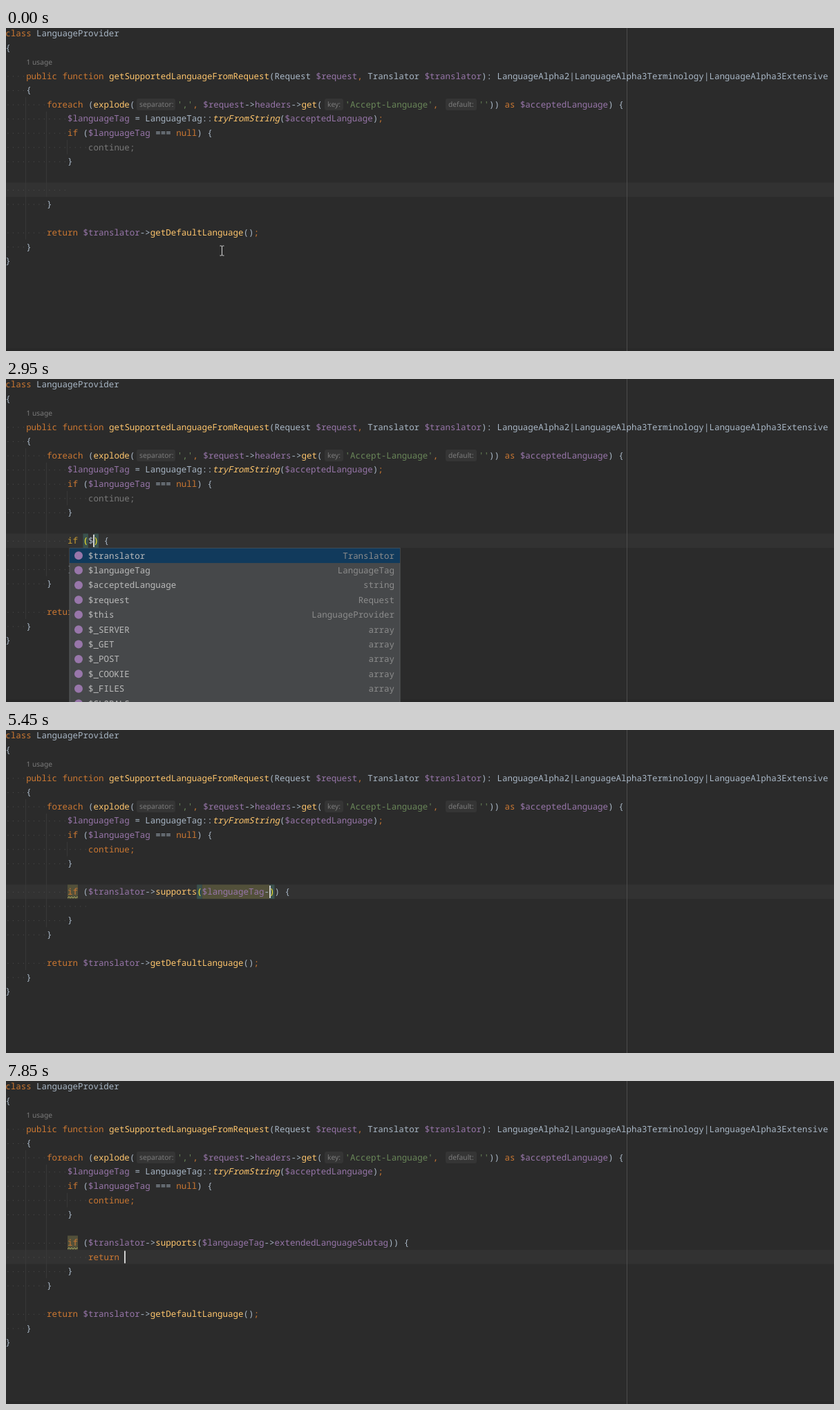
Animation, 1198 px wide and 467 px high, one loop 8 s. Source, as an HTML page:

```html
<!DOCTYPE html>
<html lang="en">
<head>
<meta charset="utf-8">
<title>Typing in a code editor</title>
<style>
  html, body { margin: 0; width: 100%; height: 100%; overflow: hidden; background: #2b2b2b; }
  svg { display: block; width: 1198px; height: 467px; }
  text { font: 12.48px "Noto Sans Mono", "DejaVu Sans Mono", monospace; white-space: pre; text-rendering: geometricPrecision; }
  .ui { font: 10.25px "Noto Sans", "Open Sans", sans-serif; fill: #7c7c7c; }
  .dots { stroke: #4f4f4f; stroke-dasharray: 1 6.487; }
  .guide { stroke: #383838; }
</style>
</head>
<body>
<svg id="stage" viewBox="0 0 1198 467">
  <g id="view"></g>
  <g id="mouse" fill="none" stroke="#d8d8d8"><path d="M-3 -7h2.2l.8 .8l.8 -.8h2.2M0 -6.5V6.5M-3 7h2.2l.8 -.8l.8 .8h2.2"/></g>
</svg>
<script>
const LOOP = 8000, CELL = 7.487, PITCH = 20.57;
const COLOR = { text: '#a9b7c6', key: '#cc7832', name: '#9876aa', call: '#ffc66d', str: '#6a8759', dim: '#787878', match: '#ffef28' };
const KEYWORDS = /^(class|public|function|foreach|as|if|null|continue|return)$/;
const TOKEN = /'[^']*'|\$\w*|\w+|->|::|[(),;]|[^\s\w$'(),;]+/g;

const colX = col => col * CELL - 0.8;
const rowY = row => row * PITCH - 2.7;
const baseY = row => row * PITCH + 12;
const rect = (x, y, w, h, fill, more = '') =>
  `<rect x="${x}" y="${y}" width="${w}" height="${h}" fill="${fill}" ${more}/>`;
const cells = (row, from, to, fill) => rect(colX(from), rowY(row), (to - from) * CELL, PITCH, fill);
const label = (x, y, text, fill, more = '') => `<text x="${x}" y="${y}" fill="${fill}" ${more}>${text}</text>`;

function tokenColor(word, before, after) {
  if (word[0] === "'") return COLOR.str;
  if (word[0] === '$') return word === '$' ? COLOR.text : COLOR.name;
  if (/[,;]/.test(word) || KEYWORDS.test(word)) return COLOR.key;
  if (/^\w/.test(word)) {
    if (after[0] === '(') return COLOR.call;
    if (before.endsWith('->')) return COLOR.name;
  }
  return COLOR.text;
}

// One code line; opt may hold a pixel start, matched bracket columns, one colour, or an "if" colour.
function code(row, col, text, opt = {}) {
  const start = opt.x ?? colX(col);
  let out = '';
  for (const m of text.matchAll(TOKEN)) {
    const word = m[0], at = m.index;
    let fill = opt.fill || tokenColor(word, text.slice(0, at), text.slice(at + word.length));
    if (opt.match?.includes(col + at)) fill = COLOR.match;
    if (word === 'if' && opt.ifColor) fill = opt.ifColor;
    const slant = word === 'tryFromString' ? 'font-style="italic"' : '';
    out += `<tspan x="${start + at * CELL}" fill="${fill}" ${slant}>${word}</tspan>`;
  }
  return `<text y="${baseY(row)}">${out}</text>`;
}

const dots = (row, count) =>
  `<path class="dots" d="M${colX(0.5) - 0.5} ${baseY(row) - 3.8}h${count * CELL - 2}"/>`;
const line = (row, indent, text, opt) => dots(row, indent) + code(row, indent, text, opt);
const guide = (x, from, to) => `<path class="guide" d="M${x + 0.5} ${rowY(from)}V${rowY(to)}"/>`;
const hint = (x, w, text) =>
  rect(x, 102, w, 17, '#353535', 'rx="3"') + label(x + 4, 114.3, text, COLOR.dim, 'class="ui"');

function popup({ col, row = 11, right, bottom, items }) {
  const left = colX(col) - 27, top = rowY(row + 1) + 0.5, step = 21.4;
  let out = rect(left, top, right - left, bottom - top, '#46484a', 'stroke="#5a5c5e"');
  out += rect(left, top, right - left, step, '#113a5c');
  items.forEach(([name, type], i) => {
    const y = top + i * step + 15;
    out += `<circle cx="${left + 13}" cy="${y - 4.5}" r="6" fill="${name[0] === '$' ? '#9876aa' : '#b0783c'}"/>`;
    out += label(left + 27, y, name, '#bbbbbb');
    out += label(right - 8, y, type, '#8c8c8c', 'text-anchor="end"');
  });
  const foot = bottom - 20;
  if (bottom < 467) out += rect(left, foot, right - left, 20, '#3c3f41') +
    label(left + 8, foot + 14, 'Press Enter to insert, Tab to replace', COLOR.dim, 'class="ui"');
  return out;
}

const vars = [['$translator', 'Translator'], ['$languageTag', 'LanguageTag'], ['$acceptedLanguage', 'string'],
  ['$request', 'Request'], ['$this', 'LanguageProvider'], ['$_SERVER', 'array'], ['$_GET', 'array'],
  ['$_POST', 'array'], ['$_COOKIE', 'array'], ['$_FILES', 'array'], ['$GLOBALS', 'array']];
const tagVars = [vars[1], vars[0], ...vars.slice(2)];
const subtags = [['extendedLanguageSubtag', 'string|null'], ['languageSubtag', 'string'], ['scriptSubtag', 'string|null'],
  ['regionSubtag', 'string|null'], ['variantSubtag', 'string|null'], ['tryFromString', 'LanguageTag|null']];
const returns = ['return', 'return false', 'return null', 'return true', 'return $this', 'register_tick_function',
  'realpath_cache_get', 'REQUEST_TIME', 'restore_error_handler', 'array_reverse'].map(name => [name, '']);

const method = { col: 29, right: 660, bottom: 286, items: [['supports', 'bool']] };
const member = { col: 52, right: 833, bottom: 399, items: subtags };
const varList = { col: 16, right: 570, bottom: 480, items: vars };
const tagList = { col: 38, right: 798, bottom: 480, items: tagVars };
const call = arg => `if ($translator->supports(${arg})) {`;

const start = { text: '', body: '', row: 11, col: null, open: false, match: [], popup: null,
  usage: [], warn: false, arg: 0, reached: false };
const steps = [
  [450, { col: 12 }],
  [920, { col: null }],
  [1080, { text: 'i', col: 13 }],
  [1150, { text: 'if', col: 14 }],
  [1240, { text: 'if ', col: 15 }],
  [1390, { text: 'if ()', col: 16, match: [15, 16] }],
  [1550, { col: 17 }],
  [1630, { text: 'if () ', col: 18, match: [] }],
  [1780, { text: 'if () {}', col: 19, match: [18, 19] }],
  [2100, { text: 'if () {', open: true, row: 12, col: 16, match: [] }],
  [2250, { row: 11, col: 19 }],
  [2330, { col: 18 }],
  [2400, { col: 17, match: [15, 16] }],
  [2550, { col: 16 }],
  [2710, { text: 'if ($) {', col: 17, match: [15, 17] }],
  [2790, { popup: varList }],
  [3100, { text: 'if ($t) {', col: 18, match: [15, 18] }],
  [3340, { text: 'if ($translator) {', col: 27, match: [15, 27], popup: null }],
  [3420, { usage: [[3, 81, 92], [11, 16, 27], [16, 15, 26]] }],
  [3500, { text: 'if ($translator-) {', col: 28, match: [15, 28], usage: [] }],
  [3730, { text: 'if ($translator->) {', col: 29, match: [15, 29] }],
  [3810, { popup: method, reached: true }],
  [3970, { text: 'if ($translator->s) {', col: 30, match: [15, 30] }],
  [4270, { text: call(''), col: 38, match: [37, 38], popup: null }],
  [4670, { text: call('$'), col: 39, match: [37, 39], warn: true, arg: 39 }],
  [4750, { popup: tagList }],
  [4910, { text: call('$l'), col: 40, match: [37, 40], arg: 40 }],
  [5290, { text: call('$languageTag'), col: 50, match: [37, 50], arg: 50, popup: null }],
  [5370, { usage: [[6, 12, 24], [7, 16, 28]] }],
  [5450, { text: call('$languageTag-'), col: 51, match: [37, 51], arg: 51, usage: [] }],
  [5690, { text: call('$languageTag->'), col: 52, match: [37, 52], arg: 52, popup: { ...member, right: 798 } }],
  [5750, { popup: member }],
  [6070, { text: call('$languageTag->e'), col: 53, match: [37, 53], arg: 53 }],
  [6310, { text: call('$languageTag->ex'), col: 54, match: [37, 54], arg: 54,
    popup: { ...member, bottom: 286, items: subtags.slice(0, 1) } }],
  [6550, { text: call('$languageTag->extendedLanguageSubtag'), col: 74, match: [37, 74], arg: 0, popup: null }],
  [6850, { col: 78, match: [] }],
  [6930, { row: 12, col: 16 }],
  [7310, { body: 'r', col: 17 }],
  [7390, { body: 're', col: 18 }],
  [7470, { body: 'ret', col: 19 }],
  [7540, { body: 'retu', col: 20 }],
  [7620, { body: 'retur', col: 21, popup: { col: 16, row: 12, right: 563, bottom: 480, items: returns } }],
  [7700, { body: 'return', col: 22, popup: null }],
  [7850, { body: 'return ', col: 23 }]
];

function draw(s) {
  const end = s.open ? 14 : 12;
  let out = rect(0, 463, 1198, 4, '#282828') + rect(0, rowY(s.row), 1198, PITCH, '#323232');
  out += guide(28, 5, end + 3) + guide(58, 6, end) + guide(88, 8, 9) + rect(898, 0, 1, 467, '#4d4d4d');
  s.usage.forEach(u => out += cells(...u, '#344134'));
  if (s.warn) out += cells(11, 12, 14, '#52503a');
  if (s.arg) out += cells(11, 38, s.arg, '#52503a');
  s.match.forEach(c => out += cells(11, c, c + 1, '#3b514d'));

  out += code(0, 0, 'class LanguageProvider') + code(1, 0, '{') + label(29.5, 53.3, '1 usage', COLOR.dim, 'class="ui"');
  out += line(3, 4, 'public function getSupportedLanguageFromRequest(Request $request, Translator $translator): ' +
    'LanguageAlpha2|LanguageAlpha3Terminology|LanguageAlpha3Extensive');
  out += line(4, 4, '{') + line(5, 8, 'foreach (explode(');
  out += hint(189, 56, 'separator:') + code(5, 0, "',', $request->headers->get(", { x: 247.8 });
  out += hint(461, 27, 'key:') + code(5, 0, "'Accept-Language',", { x: 490.5 });
  out += hint(636, 45, 'default:') + code(5, 0, "'')) as $acceptedLanguage) {", { x: 684 });
  out += line(6, 12, '$languageTag = LanguageTag::tryFromString($acceptedLanguage);');
  out += line(7, 12, 'if ($languageTag === null) {');
  out += line(8, 16, 'continue;', s.reached ? {} : { fill: COLOR.dim }) + line(9, 12, '}');

  out += line(11, 12, s.text, { match: s.match, ifColor: s.warn ? '' : '#c99c32' });
  if (s.open) out += line(12, 16, s.body) + line(13, 12, '}');
  out += line(end, 8, '}') + line(end + 2, 8, 'return $translator->getDefaultLanguage();');
  out += line(end + 3, 4, '}') + code(end + 4, 0, '}');

  if (s.warn) out += '<path d="M89 243l2 -2' + 'l2 2l2 -2'.repeat(3) + 'l1 1" fill="none" stroke="#a5a860"/>';
  if (s.popup) out += popup(s.popup);
  if (s.col !== null) out += rect(Math.round(colX(s.col)), rowY(s.row) + 1.4, 2, 18, '#d0d0d0');
  return out;
}

const view = document.getElementById('view'), mouse = document.getElementById('mouse');
let shown = -1;

function frame(now) {
  const t = now % LOOP;
  const past = steps.filter(([at]) => at <= t);
  if (past.length !== shown) {
    shown = past.length;
    view.innerHTML = draw(Object.assign({}, start, ...past.map(step => step[1])));
  }
  // The pointer glides in seven steps and hides once typing starts.
  const p = t < 70 ? 0 : Math.min(7, Math.floor((t - 70) / 75) + 1) / 7;
  const ease = p * p * (3 - 2 * p);
  mouse.setAttribute('transform', `translate(${312.5 - 161 * ease} ${322 - 90.5 * ease})`);
  mouse.setAttribute('visibility', t < 1080 ? 'visible' : 'hidden');
  requestAnimationFrame(frame);
}
frame(0);
</script>
</body>
</html>
```
